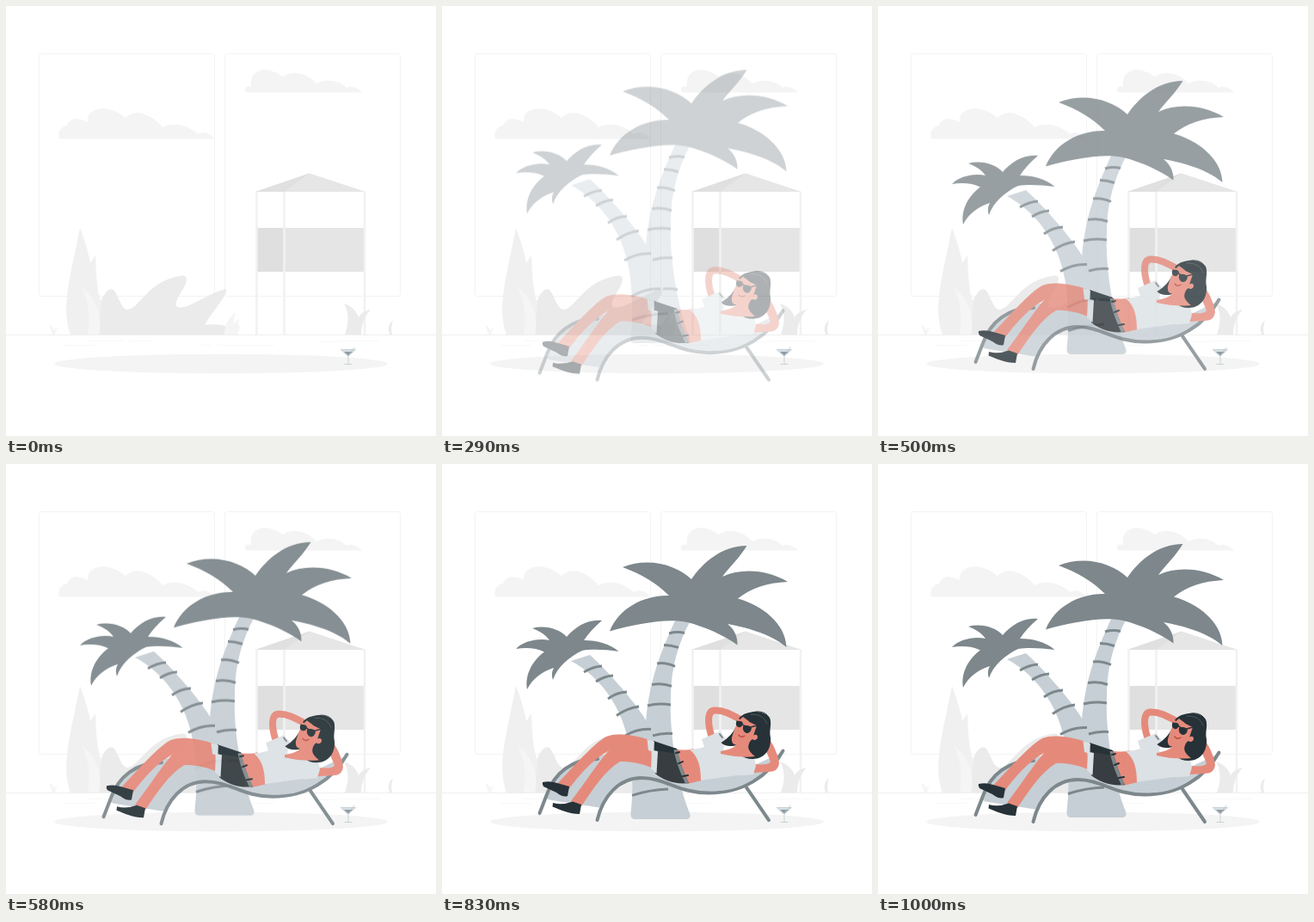
An HTML page that plays this animation: 500x500 px, repeating every 1.04 s.

```html
<!DOCTYPE html>
<html lang="en">
<head>
<meta charset="utf-8">
<title>Resting under the palms</title>
<style>
html, body { margin: 0; height: 100%; overflow: hidden; background: #fff; }
svg { display: block; width: 100%; height: 100%; }
.line { fill: none; stroke-linecap: round; }
.skin { fill: #e58a7b; }
.dark { fill: #263238; }
.shirt { fill: #dbe1e4; }
.wood { fill: #c6cfd5; }
.leaf { fill: #7d878c; }
.grey { stroke: #7d888d; }
.bands { fill: none; stroke-width: 3; }
</style>
</head>
<body>
<svg viewBox="0 0 500 500">
  <!-- backdrop -->
  <g fill="none" stroke="#f3f3f3">
    <rect x="38.5" y="55.5" width="204" height="282" rx="3"/>
    <rect x="254.5" y="55.5" width="204" height="282" rx="3"/>
  </g>
  <g fill="#f4f4f4">
    <path d="M62 154.500C60 148 62 141 71 139C74 130 84 129 95 135C93 119 117 112 139 130C150 118 170 126 182 141C195 134 213 139 223 149C230 145 238 148 242 154.500Z"/>
    <path d="M279 100.500C276 96 279 92 285 94C282 75 301 67 322 82C335 73 351 79 361 90C375 84 388 87 396 95C402 92 410 96 414 100.500Z"/>
  </g>
  <path d="M290 216L353 194.500L418 216Z" fill="#e6e6e6"/>
  <path d="M290 216L353 194.500L323 216Z" fill="#e0e0e0"/>
  <path d="M292 258H416V309H292Z" fill="#e5e5e5"/>
  <path d="M292 258H323V309H292Z" fill="#dfdfdf"/>
  <path d="M291.500 216V382M323.500 216V382M417 216V382" stroke="#f2f2f2" stroke-width="2.600"/>
  <path d="M106 382L108 350C113 334 120 325 126 331C131 338 134 352 141 353C156 352 164 319 205 313.500C213 313 210 322 206 329C200 338 195 347 199 350C212 354 233 334 256 329C258 337 241 353 231 371C242 369 258 371 259 375L256 382Z" fill="#ebebeb"/>
  <path d="M75 382C63 350 76 310 86 258C92 274 96 287 98 299L104 290C105 315 106 333 111 345L108 382Z" fill="#f0f0f0"/>
  <g fill="#f5f5f5">
    <path d="M88 327C105 339 113 362 108 382H95C98 364 97 345 88 327Z"/>
    <path d="M254 382C254 370 260 361 267 356C265 362 265 365 265 369L271 363Q269 369 272 374L269 382Z"/>
    <path d="M50 370Q55 374 56 377L60 373L57 382H54Z"/>
  </g>
  <g fill="#ebebeb">
    <path d="M394 382C399 368 399 357 393 346C402 349 408 355 410 362C413 357 418 354 424 353C417 361 413 371 413 382Z"/>
    <path d="M446 382Q442 372 450 365Q447 374 449 382Z"/>
  </g>
  <path d="M0 382.500H500" stroke="#efefef"/>
  <path d="M67 394.500H104M95 389.500H138M143 389.500H172M228 394.500H240M246 394.500H312M363 390.500H383M385 389.500H434" stroke="#f8f8f8"/>
  <ellipse cx="250" cy="416" rx="194" ry="11.300" fill="#f4f4f4"/>
  <g class="line" stroke="#c7d2d9">
    <path d="M389.500 399.500H406.500L398 407ZM398 407V416M394 416.500H402" fill="#d7dfe3"/>
    <path d="M393 402H403L398 406.500Z" fill="#8f9ba3" stroke="none"/>
    <path d="M399 405L405 397" stroke="#b4bec4" stroke-width=".7"/>
  </g>

  <g id="palms">
    <path class="wood" d="M150 227C185 246 216 285 220 345Q223 375 219.500 404Q219 411 224 411H272L262 345C258 338 248 326 243 306C230 280 194 240 172 220Z"/>
    <path class="wood" d="M272 178C255 215 238 255 236.500 310L240 411H285Q290 410 288 404C274 370 264 310 266 270C266 235 275 205 290 178Z"/>
    <path class="bands grey" transform="translate(0 -1.5)" d="M264 196.500Q273 194 282 196M258 210Q266 210 275 213M250 231.500Q260 230 271 235M244 256Q257 254 267 258M239 280.500Q252 277 266 279.500M245 315.500Q256 312 268 313M257 349Q266 348 274 350M165 241.500Q176 235 186 234.500M179 252.500Q189 246 199 245.500M193 272.500Q203 265 215 264.500M203 292Q216 283 229 281.500M212 316Q227 307 243 308M220 358Q237 348 254 349M221 385Q242 378 263 377.500"/>
    <path class="leaf" d="M105 189C120 185 137 190 145 199C155 187 170 178 186 180C177 188 170 195 165 203C181 203 195 207 205.500 216C190 214 175 213 163 215C148 222 134 234 129 249C127 243 128 239 130 235C115 240 105 248 99 260C96 242 106 226 119 216.500C110 212 98 211 86 213C94 204 112 200 125 203C120 196 113 192 105 189Z"/>
    <path class="leaf" d="M210 118C240 106 272 115 290 132C303 113 325 93 354.500 93C346 107 335 117 326 129C350 118 380 122 402 135C378 136 358 143 344 154.500C372 162 400 184 400.500 211C380 194 352 188 332 184C340 190 344 199 343.500 208.500C328 197 305 187 285 182C262 177 225 184 195 192.500C205 166 235 150 264 151C250 137 232 126 210 118Z"/>
  </g>

  <g id="lounger">
    <path class="line grey" stroke-width="4" d="M354 378L380 416"/>
    <path class="wood" d="M120 387Q120 392 128 393L186 402C192 385 205 367 232 367C260 368 275 384.500 310 384.500C350 384.500 380 365 396 337L364 352L300 362L245 345L190 340C150 342 132 358 120 387Z"/>
    <path class="line grey" stroke-width="4" d="M113.500 408L122 386C131 361 151 345 181 345M180.500 416C187 388 206 367 232 367C260 367 275 384.500 310 384.500C350 384.500 380 365 396.500 335.500"/>

    <!-- legs -->
    <path class="skin" d="M242 323C224 317 203 314 191 319C176 327 151 356 134 374L146 382C160 363 178 342 199 333L243 345Z"/>
    <path class="skin" d="M242 328C222 323 203 327 193 336C180 351 166 373 150 394L162 400C176 379 190 358 207 348C220 347 235 351 246 356Z"/>
    <path class="dark" d="M117 372Q125 370 134 373L148 377L146 388Q141 390 133 384L118 377Q116 374 117 372Z"/>
    <path class="dark" d="M129 396Q140 399 152 394.500L162 398L160 409C148 409 137 404 128.500 400.500Z"/>

    <!-- waist -->
    <path class="skin" d="M270 333Q282 336 292 333L302 345V370L285 374Z"/>
    <path d="M246 324C256 329 266 332 273 333C276 347 281 361 287 373C271 375 256 369 248 362Z" fill="#373d40"/>
    <path class="dark" d="M246 324L273 333L275 339L248 335Z"/>
    <path class="shirt" d="M238.500 322L247 325L246 335L251 336L249.500 362L243 356L244 336L240 335Z"/>
    <path d="M271.500 334Q275 353 285 373" fill="none" class="grey" stroke-width="4"/>
    <path class="line" d="M272 338L276 337M275 350L280 348M280 365L286 364" stroke="#263238" stroke-width="2"/>

    <!-- arms and shirt -->
    <path class="line" d="M313 317C309 304 308 289 317 288.500C327 288 336 293 347 299" stroke="#e58a7b" stroke-width="8"/>
    <path class="skin" d="M380 321C386 329 391 341 392 350C391 357 387 360 379 360L361 361L364 351C374 352 381 351 382 348L376 334Z"/>
    <path class="shirt" d="M302 322L323 313L330 321L327 334L344 341L363 342L365 353L362 363L342 365L301 370C301 354 298 342 288 334Q297 334 305 331Z"/>
    <path class="wood" d="M302 370L343 364L365 366Q342 384 310 382Z"/>

    <!-- head -->
    <path class="dark" d="M343 305C339 314 334 320 324.500 326C329 331 338 331 346 328Z"/>
    <path class="dark" d="M345 298C350 290 372 285 381 297C384 305 380 311 382 320C383 334 375 345 361 345Q352 345 347 340L353 326L358 306Z"/>
    <path class="skin" d="M324 336C335 334 343 331 344 325L360 322C354 330 355 335 364 342Q346 344 324 339Z"/>
    <path class="skin" d="M350 296C344 300 340 310 337 320C336 328 341 330 347 328C353 327 358 324 361 322C365 325 369 320 366 317Q363 316 362 318L366 306Q357 302 350 296Z"/>
    <path class="dark" d="M342 302Q347 299 350 303Q349 309 345 308Q341 307 342 302ZM350 307Q356 304 360 309Q359 315 354 315Q349 313 350 307Z"/>
    <path class="line" d="M343 301L352 306.500L359 308L366 306" stroke="#263238" stroke-width="1.500"/>
    <path class="line" d="M345 317Q348 321 352 318" stroke="#b8473d" stroke-width="1.300"/>
    <path class="line" d="M358 292C371 286 384 293 381 306M357 301L363 304" stroke="#263238"/>
    <path class="line" d="M359 293Q374 292 378 304" stroke="#5b666c" stroke-width=".7"/>
    <path class="line grey" d="M323 316L326 320" stroke-width="2"/>
  </g>
</svg>
<script>
const LOOP = 1040, STEP = 1000 / 24, TRAVEL = 30;
const palms = document.getElementById('palms');
const lounger = document.getElementById('lounger');

const bezier = (a, b, s) => 3 * a * s * (1 - s) ** 2 + 3 * b * s * s * (1 - s) + s ** 3;

// cubic-bezier(.36, -.01, .5, 1.38), solved by bisection
function ease(x) {
  let lo = 0, hi = 1;
  for (let i = 0; i < 24; i++) {
    const mid = (lo + hi) / 2;
    if (bezier(.36, .5, mid) < x) lo = mid; else hi = mid;
  }
  return bezier(-.01, 1.38, hi);
}

function place(group, y, opacity) {
  group.setAttribute('transform', `translate(0 ${y})`);
  group.setAttribute('opacity', opacity);
}

function draw(now) {
  const step = Math.floor((now % LOOP + 4) / STEP);
  const progress = ease(Math.min(1, (step + 1) / 24.5));
  const shift = TRAVEL * (1 - progress);
  const opacity = step < 3 ? 0 : Math.min(1, progress);
  place(palms, -shift, opacity);
  place(lounger, shift, opacity);
}

const start = performance.now();
function tick() {
  draw(performance.now() - start);
  requestAnimationFrame(tick);
}
tick();
</script>
</body>
</html>
```
